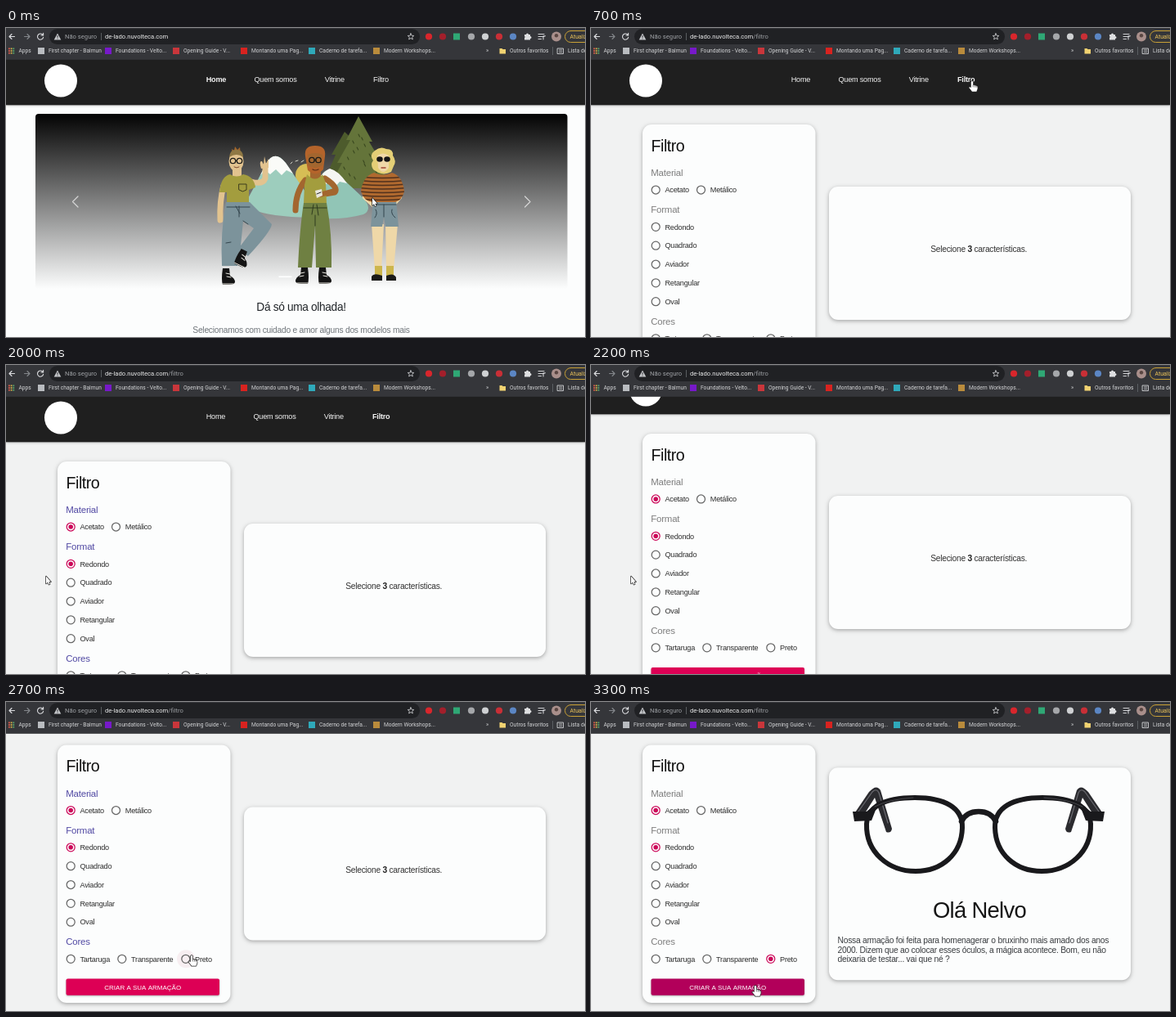
Animation, 708 px wide and 378 px high, one loop 3.4 s. Source, as an HTML page with a canvas:

```html
<!DOCTYPE html>
<html lang="pt-BR">
<head>
<meta charset="utf-8">
<title>Filtro</title>
<style>
html, body { margin: 0; width: 100%; height: 100%; overflow: hidden; background: #f1f2f2; }
canvas { display: block; }
</style>
</head>
<body>
<canvas id="stage" width="708" height="378"></canvas>
<script>
const ctx = document.getElementById('stage').getContext('2d');
const LOOP = 3400, STEP = 100;
const SANS = '"Liberation Sans", Arial, sans-serif';
const UI = 'Roboto, "Noto Sans", sans-serif';
const PINK = '#cc0859', INK = '#19191c';

// ---------- helpers ----------
function text(s, x, cy, size, color, o = {}) {
  ctx.font = `${o.bold ? 'bold ' : ''}${size}px ${o.font || SANS}`;
  ctx.textAlign = o.align || 'left';
  ctx.letterSpacing = (o.gap || 0) + 'px';
  ctx.fillStyle = color;
  ctx.fillText(s, x, cy + size * 0.355);
  const w = ctx.measureText(s).width;
  ctx.letterSpacing = '0px';
  return w;
}
// Page copy is set slightly large and tight
function copy(s, x, cy, size, color, o = {}) {
  return text(s, x, cy, size * 1.05, color, { ...o, gap: (o.gap || 0) - size * 0.026 });
}
function rect(x, y, w, h, color) {
  ctx.fillStyle = color;
  ctx.fillRect(x, y, w, h);
}
function round(x, y, w, h, r, color) {
  ctx.beginPath();
  ctx.roundRect(x, y, w, h, r);
  ctx.fillStyle = color;
  ctx.fill();
}
function dot(x, y, r, color) {
  ctx.beginPath();
  ctx.arc(x, y, r, 0, 7);
  ctx.fillStyle = color;
  ctx.fill();
}
function ring(x, y, r, color, w) {
  ctx.beginPath();
  ctx.arc(x, y, r, 0, 7);
  ctx.strokeStyle = color;
  ctx.lineWidth = w;
  ctx.stroke();
}
function fill(d, color) {
  ctx.fillStyle = color;
  ctx.fill(new Path2D(d));
}
function line(d, color, w = 1) {
  ctx.strokeStyle = color;
  ctx.lineWidth = w;
  ctx.lineCap = ctx.lineJoin = 'round';
  ctx.stroke(new Path2D(d));
}
// Eased value along [time, ...values] stops
function track(stops, t) {
  if (t <= stops[0][0]) return stops[0].slice(1);
  for (let i = 1; i < stops.length; i++) {
    const a = stops[i - 1], b = stops[i];
    if (t <= b[0]) {
      const k = (t - a[0]) / (b[0] - a[0]);
      const e = k * k * (3 - 2 * k);
      return a.slice(1).map((v, j) => v + (b[j + 1] - v) * e);
    }
  }
  return stops[stops.length - 1].slice(1);
}

// ---------- timeline ----------
const POINTER = [
  [0, 448, 208], [500, 466, 65], [800, 466, 65], [1300, 81, 198], [1400, 81, 198],
  [1700, 80, 243], [1800, 80, 243], [2000, 49, 258.5], [2200, 49, 258.5],
  [2600, 227, 310], [2800, 227, 310], [3200, 201, 347]
];
const SCROLL = [[2000, 0], [2390, 65.5]];
const between = (t, a, b) => t >= a && t < b;

// ---------- browser ----------
const BOOKMARKS = [
  [43, 52, 'First chapter - Balmun', '#b9bcc0'],
  [125, 134, 'Foundations - Velto...', '#7719c9'],
  [208, 217, 'Opening Guide - V...', '#c9363b'],
  [291, 300, 'Montando uma Pag...', '#d8231f'],
  [374, 383, 'Caderno de tarefa...', '#2fa9ba'],
  [453, 462, 'Modern Workshops...', '#b98b3c']
];
const ADDONS = [
  [517, '#d9262c'], [534, '#a31f2b'], [551, '#2fa875'], [569, '#a5a7aa'],
  [586, '#cfd1d3'], [603, '#c92f36'], [620, '#5b86c4']
];

function browser(path) {
  rect(0, 0, 708, 38.8, '#35363a');
  round(53, 1, 453, 19, 9.5, '#202124');
  line('M10.5 10.5H4M7 7.5L4 10.5L7 13.5', '#dcdde0', 1.1);
  line('M22.5 10.5H29M26 7.5L29 10.5L26 13.5', '#83868b', 1.1);
  line('M44.6 8A3.6 3.6 0 1 0 45.6 11.4M45.6 6.4V9H43', '#dcdde0', 1.1);
  fill('M63 6.6L67.3 14.4H58.7Z', '#c4c6c9');
  line('M63 9.4V11.3M63 12.9V13', '#202124', .9);
  text('Não seguro', 72, 10.7, 7.65, '#9fa2a6', { font: UI });
  rect(116, 6, .8, 9, '#6a6d71');
  const w = text('de-lado.nuvolteca.com', 121, 10.7, 7.65, '#eceded', { font: UI });
  text(path, 121 + w, 10.7, 7.65, '#9a9da1', { font: UI });

  let star = '';
  for (let i = 0; i < 10; i++) {
    const a = i * Math.PI / 5 - Math.PI / 2, r = i % 2 ? 1.8 : 4;
    star += (i ? 'L' : 'M') + (495 + r * Math.cos(a)) + ' ' + (10.7 + r * Math.sin(a));
  }
  line(star + 'Z', '#d5d6d8', .8);
  ADDONS.forEach(([x, c], i) => i === 2 ? rect(x - 4, 6.5, 8, 8, c) : dot(x, 10.5, 4.1, c));
  fill('M634 8H636A1.5 1.5 0 0 1 639 8H641V10A1.5 1.5 0 0 1 641 13V14.5H634V12A1.2 1.2 0 0 0 634 10Z', '#dedfe1');
  line('M651 7.5H658M651 10.5H658M651 13.5H654.5M657 14V9.8H659.5', '#d0d1d4', 1.1);
  dot(673, 10.5, 6, '#a98f8b');
  dot(673, 9.3, 2.2, '#5a4642');
  ctx.beginPath();
  ctx.roundRect(683.5, 3.5, 50, 14, 7);
  ctx.strokeStyle = '#caa136';
  ctx.lineWidth = 1;
  ctx.stroke();
  text('Atualizar', 689.5, 10.7, 6.9, '#efc65a', { font: UI });

  for (let i = 0; i < 9; i++) {
    rect(3 + i % 3 * 2.7, 24.4 + Math.floor(i / 3) * 2.7, 1.8, 1.8, ['#d95b4b', '#d8b04a', '#55a36c'][i % 3]);
  }
  const mark = (s, x) => text(s, x, 28.1, 6.65, '#d3d4d6', { font: UI });
  mark('Apps', 15.5);
  BOOKMARKS.forEach(([ix, x, s, c]) => {
    rect(ix - 4, 24, 8, 8, c);
    mark(s, x);
  });
  mark('»', 587);
  fill('M603.5 25H606.5L607.5 26H611V31.5H603.5Z', '#f1d271');
  mark('Outros favoritos', 616);
  rect(668, 23, .8, 10, '#66696d');
  line('M674.5 25H681.5V31.5H674.5ZM676.5 27H679.7M676.5 29.3H679.7', '#d3d4d6', .9);
  mark('Lista de leitura', 687);
}

function header(active) {
  ctx.save();
  ctx.shadowColor = 'rgba(0,0,0,.35)';
  ctx.shadowBlur = 3;
  ctx.shadowOffsetY = 1;
  rect(0, 30, 708, 64.3, '#1f1f1f');
  ctx.restore();
  dot(67, 64.5, 20, '#fff');
  const shift = active === 'Filtro' ? 1 : 0;
  [['Home', 244.7], ['Quem somos', 303.5 - shift], ['Vitrine', 389.7 - shift], ['Filtro', 449 - shift]]
    .forEach(([s, x]) => copy(s, x, 63.2, 8.7, '#f4f4f4', { bold: s === active }));
}

// ---------- home ----------
function shoe(x, y, dir, angle = 0) {
  ctx.save();
  ctx.translate(x, y);
  ctx.rotate(angle);
  ctx.scale(dir, 1);
  fill('M-5 -12H3L4 -3Q10 0 10 5Q9 8 3 8H-5Q-7 2 -5 -12Z', '#141414');
  line('M-5 7H8M-1 -6L4 -5M0 -2L5 -1', '#eceae2', 1);
  ctx.restore();
}
function specs(x, y) {
  ring(x - 4, y, 3.2, '#1b1b18', 1.3);
  ring(x + 4, y, 3.2, '#1b1b18', 1.3);
  line(`M${x - 1} ${y}H${x + 1}`, '#1b1b18', 1);
}

function scenery() {
  dot(368, 180, 14, '#d6bd55');
  fill('M414 127L398 155L403 155L390 185H438V150Z', '#4d5b2c');
  fill('M431 108L416 137L421 137L405 165L411 165L394 196H472L455 166L460 166L444 139L448 139Z', '#64743a');
  for (let i = 0; i < 16; i++) {
    const y = 130 + i * 4, x = 431 + Math.sin(i * 2.4) * (i * 1.6 + 4);
    line(`M${x} ${y}l1.5 3`, '#39471f', 1.1);
  }
  fill('M350 229Q372 197 388 177Q396 169 405 178L437 208Q449 222 437 228Q402 238 350 229Z', '#91c5b6');
  fill('M378 190Q389 174 396 172Q406 174 417 190L408 188L402 195L394 189L386 195Z', '#f5f6f3');
  fill('M293 214Q306 190 317 168Q328 147 342 165L372 209L394 231Q330 234 298 221Z', '#9dcdbd');
  fill('M311 180L318 166Q328 148 342 165L351 178L343 174L337 180L330 173L323 179L317 174Z', '#fafbf8');
  line('M348 166l2 -2M354 163l3 -1M361 164l3 -2', '#d8d9cd', 1);
}

function leftFriend() {
  const skin = '#e2c38f';
  line('M266 193Q261 212 262 235', skin, 7);
  line('M300 188Q314 192 317 184L317 169', skin, 7);
  fill('M312 172Q309 162 313 163L315 167L316 157L318 166L321 160L321 171Z', skin);
  fill('M277 170H288V183H277Z', skin);
  fill('M261 201Q263 181 274 179Q282 184 290 179Q303 181 305 195L297 198V214H270V201Z', '#a39d3e');
  line('M285 191H294V198L289.5 200L285 198Z', '#3d3c1c', 1);
  fill('M277 154L276 148L279 150L280 145L283 149L286 146L287 155Z', '#a2672d');
  ctx.beginPath();
  ctx.ellipse(281.5, 163, 9, 12.5, 0, 0, 7);
  ctx.fillStyle = skin;
  ctx.fill();
  fill('M273 158Q274 148 282 149Q290 149 290 158Q282 152 273 158Z', '#8f7844');
  specs(281.5, 162.5);
  line('M279 170Q282 172 285 170', '#7d4a2c', 1);
  fill('M269 213H298Q310 225 325 240Q324 249 296 279L284 270L303 245L290 236Q288 264 283 291H264Q262 250 269 213Z', '#7c939b');
  line('M281 218L286 227M285 218V231M270 219H298M290 236L296 240M269 263L275 262', '#33444c', 1);
  shoe(287, 283, 1, .45);
  shoe(270, 306, 1);
}

function middleFriend() {
  const skin = '#a3662f';
  line('M366 186Q354 201 354 223', skin, 7);
  line('M390 184Q407 195 402 201L384 204', skin, 7);
  fill('M372 172H385V187H372Z', skin);
  fill('M368 179Q378 190 387 179L391 190L392 215H364L365 192Z', '#a39d3e');
  line('M402 199L384 204', skin, 6);
  fill('M378 199L386 197L387 205L380 208Z', '#e9e7dc');
  line('M380 203L385 201', '#262626', 1);
  fill('M366 157Q364 144 378 144Q392 144 390 157L388 173Q379 183 369 174Z', '#b4642b');
  fill('M369 155Q378 151 387 155V168Q378 174 369 168Z', skin);
  specs(378, 161.5);
  line('M375 173Q378 175 382 173', '#542b17', 1.2);
  fill('M364 214H392Q399 252 398 293H379L378 241L374 293H357Q359 246 364 214Z', '#6f8042');
  line('M364 220H392M376 216L374 228M380 216L382 229M378 229V242', '#2e3a1e', 1);
  shoe(364, 305, -1);
  shoe(388, 305, 1);
}

function rightFriend() {
  const skin = '#efd8a8';
  fill('M447 240H462L459 296H451ZM464 240H479L474 296H465Z', skin);
  fill('M451 291H460V303H451ZM465 291H474V303H465Z', '#cdb64d');
  fill('M447 304Q450 299 460 303V309H447ZM465 303Q474 299 477 305V309H465Z', '#1a1a18');
  line('M439 207L449 216M481 207L473 216', skin, 6);
  fill('M449 210H477L480 243H464L462 231L460 243H446Z', '#7c939b');
  line('M449 216H477M462 216V231M452 222Q455 227 451 232M472 222Q470 227 476 232', '#33444c', 1);
  const knit = 'M450 177Q461 182 472 177Q485 181 487 200Q484 211 476 213H449Q437 212 434 199Q437 181 450 177Z';
  fill(knit, '#b0692f');
  ctx.save();
  ctx.clip(new Path2D(knit));
  for (let y = 182; y < 214; y += 4.5) line(`M432 ${y}Q460 ${y + 3} 489 ${y}`, '#51311d', 1.5);
  ctx.restore();
  fill('M449 173Q445 167 449 162Q444 155 451 150Q458 144 465 148Q474 148 473 156Q478 163 474 169L471 176Q460 182 449 173Z', '#e4cf76');
  fill('M454 156Q461 151 468 156V171Q461 181 455 171Z', skin);
  ctx.beginPath();
  ctx.ellipse(457, 160.5, 3.8, 3.2, 0, 0, 7);
  ctx.ellipse(466, 160.5, 3.8, 3.2, 0, 0, 7);
  ctx.fillStyle = '#151515';
  ctx.fill();
  line('M459 171H464', '#a14435', 1.4);
}

function home() {
  rect(0, 38, 708, 340, '#fcfdfd');
  const g = ctx.createLinearGradient(0, 105, 0, 319);
  g.addColorStop(0, '#030303');
  g.addColorStop(1, '#fcfdfd');
  round(36, 105, 650.5, 214, 4, g);
  scenery();
  leftFriend();
  middleFriend();
  rightFriend();
  line('M88 206L81.5 212.5L88 219M634.5 206L641 212.5L634.5 219', '#d6d6d6', 1.2);
  rect(333.5, 303.5, 16, 1.6, '#fff');
  copy('Dá só uma olhada!', 361, 341.5, 13.06, '#212529', { align: 'center' });
  copy('Selecionamos com cuidado e amor alguns dos modelos mais', 361, 369, 9.8, '#6f757a', { align: 'center' });
  header('Home');
}

// ---------- filter ----------
function card(x, y, w, h) {
  ctx.save();
  ctx.shadowColor = 'rgba(0,0,0,.32)';
  ctx.shadowBlur = 5;
  ctx.shadowOffsetY = 1.5;
  round(x, y, w, h, 11, '#fcfdfd');
  ctx.restore();
}
function radio(x, y, label, on) {
  ring(x, y, 5, on ? PINK : '#666', 1.25);
  if (on) dot(x, y, 2.8, PINK);
  copy(label, x + 11.3, y, 8.7, '#2b2b2b');
}
function halfGlasses() {
  fill('M321 138L340 110Q349 100 354 108L368 155Q367 161 361 159L347 117L333 139Z', '#2b2b2f');
  line('M327 134L344 110Q349 105 352 111L363 148', '#6a6a70', 1.2);
  line('M337 149C339 125 363 117 396 117C432 117 455 129 454 154C453 186 429 207 397 207C364 207 336 184 337 149Z', INK, 6);
  fill('M320 134L337 134L352 122L343 145L322 146Z', INK);
  line('M347 128Q364 119 394 117', '#4d4d52', .9);
}
function eyeglasses() {
  halfGlasses();
  ctx.save();
  ctx.translate(948, 0);
  ctx.scale(-1, 1);
  halfGlasses();
  ctx.restore();
  line('M453 146Q459 134 474 134Q489 134 495 146', INK, 6.5);
}

function filter(t) {
  const [scroll] = track(SCROLL, t);
  const done = t >= 3100;
  const focused = between(t, 1300, 2100) || between(t, 2700, 3100);
  const legend = focused ? '#5149a3' : '#7d7d7d';
  rect(0, 38, 708, 340, '#f1f2f2');
  ctx.save();
  ctx.translate(0, -scroll);
  header('Filtro');
  card(63, 118, 211.5, 315.5);
  copy('Filtro', 73.5, 144, 18.7, '#111');
  [['Material', 177], ['Format', 222.2], ['Cores', 358.5]]
    .forEach(([s, y]) => copy(s, 73.3, y, 10.9, legend, { gap: .08 }));

  if (between(t, 1300, 1600)) dot(79, 198, t < 1500 ? 11 : 10, t < 1500 ? '#f3c6d9' : '#f9e6ee');
  if (between(t, 1700, 2000)) dot(79, 243.3, 11, t < 1900 ? '#f3c6d9' : '#f9e6ee');
  if (between(t, 2600, 3000)) dot(220, 379.8, 11, t === 2800 ? '#f3c6d9' : '#f7eef1');

  radio(79.2, 198, 'Acetato', t >= 1300);
  radio(134.5, 198, 'Metálico', false);
  ['Redondo', 'Quadrado', 'Aviador', 'Retangular', 'Oval']
    .forEach((s, i) => radio(79.2, 243.3 + i * 22.85, s, !i && t >= 1700));
  radio(79.2, 379.8, 'Tartaruga', false);
  radio(141.8, 379.8, 'Transparente', false);
  radio(219.8, 379.8, 'Preto', t >= 2800);

  ctx.save();
  ctx.shadowColor = 'rgba(0,0,0,.3)';
  ctx.shadowBlur = 2;
  ctx.shadowOffsetY = 1;
  round(73.5, 404, 187.5, 20.3, 2, t >= 3000 ? '#b2005a' : '#dd0055');
  ctx.restore();
  copy('CRIAR A SUA ARMAÇÃO', 167.2, 414.3, 7.6, '#fff', { align: 'center', gap: .22 });

  if (!done) {
    card(291, 194, 369, 163);
    const w = copy('Selecione ', 415.3, 270.5, 9.75, '#333');
    const b = copy('3', 415.3 + w, 270.5, 9.75, '#222', { bold: true });
    copy(' características.', 415.3 + w + b, 270.5, 9.75, '#333');
  } else {
    card(291, 145.7, 369, 260);
  }
  ctx.restore();

  if (done) {
    eyeglasses();
    copy('Olá Nelvo', 475, 254, 26.1, '#161616', { align: 'center' });
    ['Nossa armação foi feita para homenagerar o bruxinho mais amado dos anos',
     '2000. Dizem que ao colocar esses óculos, a mágica acontece. Bom, eu não',
     'deixaria de testar... vai que né ?']
      .forEach((s, i) => copy(s, 301.5, 291.8 + i * 11.4, 9.8, '#3a3d40'));
  }
}

// ---------- pointer ----------
function pointer(t) {
  const [x, y] = track(POINTER, t);
  const hand = between(t, 500, 900) || between(t, 1300, 1900) || t >= 2600;
  const d = hand
    ? 'M-1.2 .8Q0 -.8 1.2 .8V5Q2.5 4.2 3.3 5.4Q4.6 4.8 5.2 6Q6.6 5.8 6.6 7.2V9.5Q6 11 5.4 12.8H0Q-1.4 10.6 -3.8 8Q-3.2 6.4 -1.2 8Z'
    : 'M0 0V9L2 7.2L3.4 10.2L4.6 9.6L3.4 6.7H6Z';
  ctx.save();
  ctx.translate(x, y);
  line(d, '#222', 1.4);
  fill(d, '#fff');
  if (hand) line('M1.2 5V7M3.3 5.4V7.2M5.2 6V7.4', '#222', .6);
  ctx.restore();
}

function draw(now) {
  const t = Math.floor(now % LOOP / STEP) * STEP;
  ctx.clearRect(0, 0, 708, 378);
  if (t < 700) home();
  else filter(t);
  browser(t < 600 ? '' : '/filtro');
  pointer(t);
}

let start;
function tick(now) {
  if (start === undefined) start = now;
  draw(now - start);
  requestAnimationFrame(tick);
}
draw(0);
requestAnimationFrame(tick);
</script>
</body>
</html>
```
